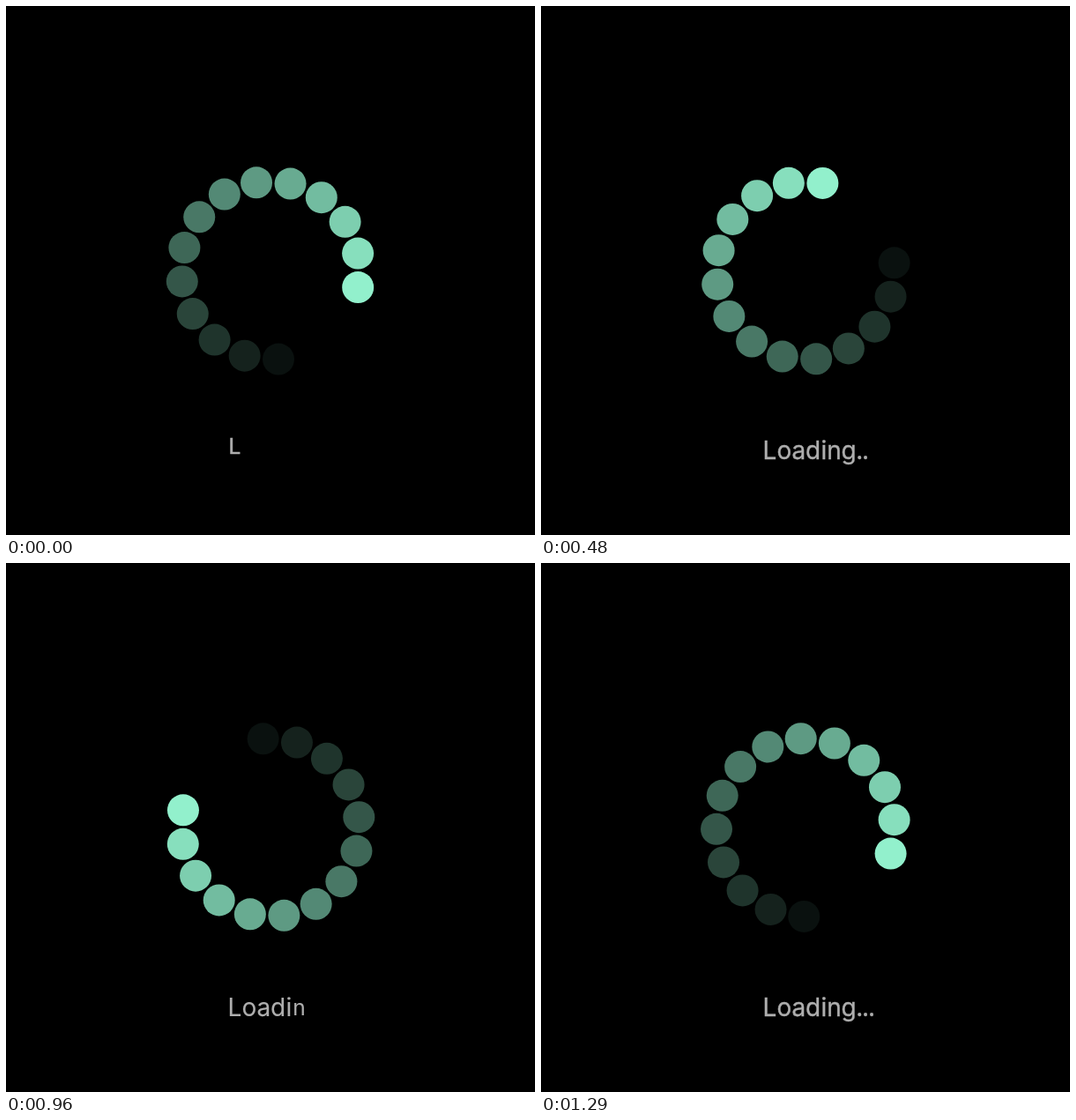
An HTML page for the animation above (1.32 s loop, 600 by 600 pixels).

```html
<!DOCTYPE html>
<html lang="en">
<head>
<meta charset="utf-8">
<title>Loading</title>
<style>
  html, body { margin: 0; width: 100%; height: 100%; overflow: hidden; background: #000; }
  svg { display: block; width: 100%; height: 100%; }
  text { font: 400 28px Inter, "Liberation Sans", sans-serif; text-anchor: middle; fill: #aeaeae; stroke: #aeaeae; }
</style>
</head>
<body>
<svg id="stage" viewBox="0 0 600 600"></svg>
<script>
const STEP = 30, LOOP = 1320, WORD_STEPS = 22;
const DOTS = 14, RADIUS = 101, GAP = 22, SPEED = 16.886, START = 10.9;
const WORD = "Loading...";
const CENTERS = [259.5, 275.8, 292.3, 308.7, 320.8, 332.4, 349, 361.2, 368, 375];
const BASELINE = 513.7, STAGGER = 1.8;

const stage = document.getElementById("stage");

function add(name, attrs) {
  const el = document.createElementNS("http://www.w3.org/2000/svg", name);
  for (const key in attrs) el.setAttribute(key, attrs[key]);
  return stage.appendChild(el);
}

const mix = (a, b, k) => a + (b - a) * Math.min(1, Math.max(0, k));

const dots = Array.from({ length: DOTS }, (_, i) =>
  add("circle", { r: 18, fill: "rgb(146,240,204)", "fill-opacity": 1 - i / DOTS }));

const letters = [...WORD].map(ch => {
  const el = add("text", {});
  el.textContent = ch;
  return el;
});

function drawRing(step) {
  dots.forEach((dot, i) => {
    const a = (START + SPEED * step - GAP * i) * Math.PI / 180;
    dot.setAttribute("cx", 300 + RADIUS * Math.cos(a));
    dot.setAttribute("cy", 300 + RADIUS * Math.sin(a));
  });
}

// Each letter drops in small, then grows to its resting size.
function drawWord(step) {
  const settled = mix(0, 0.4, (step - 7) / 7);
  letters.forEach((el, i) => {
    const age = step - STAGGER * i;
    el.setAttribute("visibility", age < 0 ? "hidden" : "visible");
    const drop = age / 0.6, grow = (age - 0.6) / 0.8;
    const scale = drop < 1 ? mix(0.87, 0.75, drop) : mix(0.75, 1, grow);
    const lift = drop < 1 ? mix(-5.7, -1.8, drop) : mix(-1.8, 0, grow);
    el.setAttribute("transform",
      `translate(${CENTERS[i]} ${BASELINE + lift}) scale(${scale})`);
    el.setAttribute("stroke-width", Math.max(settled, mix(0.7, 0, drop)));
  });
}

function render(time) {
  const step = Math.floor((time % LOOP) / STEP);
  drawRing(step);
  drawWord(step % WORD_STEPS);
}

const begin = performance.now();
function tick() {
  render(performance.now() - begin);
  requestAnimationFrame(tick);
}
tick();
</script>
</body>
</html>
```
